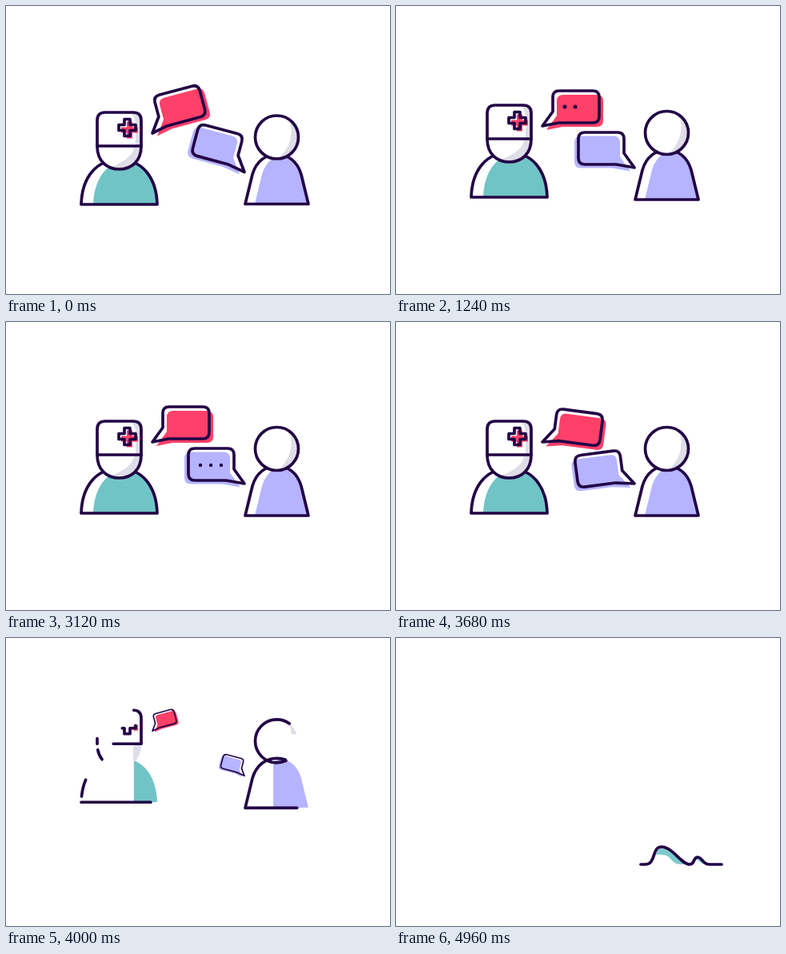
Recreate the animation shown at these times as an HTML page. Size 480 by 360 pixels, loop 5 s.

```html
<!DOCTYPE html>
<html lang="en">
<head>
<meta charset="utf-8">
<title>Doctor and patient chat</title>
<style>
  html, body { margin: 0; width: 100%; height: 100%; overflow: hidden; background: #fff; }
  svg { display: block; width: 100vw; height: 100vh; }
  .line { fill: none; stroke: #220445; stroke-width: 3.7; stroke-linecap: round; stroke-linejoin: round; }
  .shade { fill: #dedde8; }
  .white { fill: #fff; }
  .red { fill: #ff4069; }
  .teal { fill: #71c4c6; }
  .lilac { fill: #b6b4ff; }
  .dot { fill: #220445; }
</style>
</head>
<body>
<svg viewBox="0 0 480 360" xmlns="http://www.w3.org/2000/svg">
  <defs>
    <path id="coat" d="M94 239C95 205 113 183 141.500 183S188 205 189 239Z"/>
    <path id="gown" d="M299 242L308 205C313 188 325 180 338.500 180S364 188 369 205L378 242Z"/>
    <path id="hat" d="M114 166H169V134Q169 124 159 124H124Q114 124 114 134Z"/>
    <path id="face" d="M114 166C114 185 126 195 141.500 195S169 185 169 166"/>
    <path id="head" d="M365.500 158.500A27 27 0 0 0 311.500 158.500A27 27 0 0 0 365.500 158.500Z"/>
    <path id="cross" d="M141 139.500V146.500H148V153.500H155V146.500H162V139.500H155V132.500H148V139.500Z"/>
    <path id="talkL" d="M183 150L196 132V114Q196 106 204 106H246Q254 106 254 114V138Q254 146 246 146H203Z"/>
    <path id="talkR" d="M298 202L285 184V166Q285 158 277 158H236Q228 158 228 166V190Q228 198 236 198H275Z"/>
    <clipPath id="inCoat"><use href="#coat"/></clipPath>
    <clipPath id="inGown"><use href="#gown"/></clipPath>
  </defs>

  <g id="doctor">
    <g clip-path="url(#inCoat)"><g id="coatFill"><use href="#coat" class="teal" transform="translate(15 0)"/></g></g>
    <g id="coatLine"></g>
    <g class="white skin"><use href="#face"/><use href="#hat"/></g>
    <path id="faceShade" class="shade" d="M169 167C169 185 157 195 141.500 195Q136 195 131 193C143 187 159 180 160 167Z"/>
    <path class="shade skin" d="M159 125Q169 125 169 134V165H162V140Q162 130 156 125Z"/>
    <g id="crossFill"><use href="#cross" class="red" transform="translate(3 3)"/></g>
    <g id="faceLine"></g><g id="hatLine"></g><g id="crossLine"></g>
    <g id="bubbleL">
      <use href="#talkL" class="red" transform="translate(5 5)"/>
      <use href="#talkL" class="line"/>
      <g id="dotsL"></g>
    </g>
  </g>

  <g id="patient">
    <g clip-path="url(#inGown)"><g id="gownFill"><use href="#gown" class="lilac" transform="translate(12 0)"/></g></g>
    <g id="gownLine"></g>
    <use href="#head" class="white skin"/>
    <path id="headShade" class="shade" d="M354 137A27 27 0 0 1 339 185.500A42 42 0 0 0 354 137Z"/>
    <g id="headLine"></g>
    <g id="bubbleR">
      <use href="#talkR" class="lilac" transform="translate(-5 4.500)"/>
      <use href="#talkR" class="line"/>
      <g id="dotsR"></g>
    </g>
  </g>

  <g id="chart">
    <g id="chartFill" class="teal">
      <path d="M325 271Q328 261 332 261C345 261 357 283 367 283H358C342 283 345 271 333 271Q329 270 325 271Z"/>
      <path d="M373 278Q377 272 382 277L389 283Q382 283 379 279Q376 276 373 278Z"/>
    </g>
    <path id="chartLine" class="line" pathLength="100" d="M306 283H311C326 283 319 261 332 261C345 261 357 283 367 283C374 283 371 274 377 274C383 274 383 283 392 283H407"/>
  </g>
</svg>
<script>
const LOOP = 5000, TICK = 40;
const $ = id => document.getElementById(id);
const move = (el, x, y) => el.setAttribute('transform', `translate(${x} ${y})`);
const show = (el, on) => { el.style.visibility = on ? 'visible' : 'hidden'; };
const linear = p => p;
const speedUp = p => p * p;
const smooth = p => p < .5 ? 4 * p ** 3 : 1 - 4 * (1 - p) ** 3;

// Value at time t along [time, value] keys.
function track(t, keys, ease = linear) {
  if (t <= keys[0][0]) return keys[0][1];
  for (let i = 1; i < keys.length; i++) {
    const [t0, v0] = keys[i - 1], [t1, v1] = keys[i];
    if (t <= t1) return v0 + (v1 - v0) * ease((t - t0) / (t1 - t0));
  }
  return keys[keys.length - 1][1];
}

// Outlines that open a gap from a to b (percent), then retract from their start.
const outlines = [
  { name: 'coat', a: 11, b: 33, hold: 3880, end: 4120 },
  { name: 'face', a: 23, b: 100, hold: 3880, end: 4080 },
  { name: 'hat', a: 55, b: 93, hold: 3880, end: 4150 },
  { name: 'cross', a: 54, b: 100, hold: 3880, end: 4120 },
  { name: 'gown', a: 38, b: 46, hold: 4170, end: 4320 },
  { name: 'head', a: 82, b: 100, hold: 3880, end: 4160 }
].map(o => {
  const el = $(o.name).cloneNode();
  el.removeAttribute('id');
  el.setAttribute('class', 'line');
  el.setAttribute('pathLength', 100);
  $(o.name + 'Line').append(el);
  return { ...o, el };
});

function trim(t, { el, a, b, hold, end }) {
  const from = track(t, [[3720, b === 100 ? 100 : a], [3880, a]]);
  const to = track(t, [[3720, b === 100 ? 100 : a], [3880, b], [4120, 100]]);
  const first = track(t, [[hold, 0], [end, a]], speedUp);
  show(el, t < end);
  el.style.strokeDashoffset = -first;
  el.style.strokeDasharray = t <= 3720 ? 'none'
    : to >= 100 ? `${from - first} 300`
    : `${from - first} ${to - from} ${100 - to} 300`;
}

function makeDots(id, x, y, r) {
  return [0, 1, 2].map(i => {
    const c = document.createElementNS('http://www.w3.org/2000/svg', 'circle');
    c.setAttribute('class', 'dot');
    c.setAttribute('cx', x + 13 * i);
    c.setAttribute('cy', y);
    c.setAttribute('r', r);
    $(id).append(c);
    return c;
  });
}
const dotsL = makeDots('dotsL', 211, 126, 2.5);
const dotsR = makeDots('dotsR', 243, 179, 2.2);

// [time, dots shown]; a half is a dot fading in.
const typedL = [[400, 1], [520, 2], [600, 3], [720, 1], [880, 2], [960, 3], [1080, 1],
  [1240, 2], [1320, 3], [1440, 1], [1600, 2], [1680, 3], [1800, 1], [1880, 0]];
const typedR = [[2000, .5], [2040, 1], [2200, 2], [2360, 2.5], [2400, 3], [2560, 0],
  [2720, .5], [2760, 1], [2920, 2], [3080, 2.5], [3120, 3], [3280, 0]];

function type(t, dots, steps) {
  let n = 0;
  for (const [at, count] of steps) if (t >= at) n = count;
  dots.forEach((d, i) => { d.style.opacity = Math.max(0, Math.min(1, n - i)); });
}

function swing(el, x, y, angle, size) {
  el.setAttribute('transform', `translate(${x} ${y}) rotate(${angle}) scale(${size}) translate(${-x} ${-y})`);
  show(el, size > 0);
}

// Hides a percentage of a shape, from its left or its bottom edge.
function wipe(id, amount, side = 'left') {
  const el = $(id);
  show(el, amount < 100);
  el.style.clipPath = amount <= 0 ? 'none'
    : side === 'left' ? `inset(0 0 0 ${amount}%)` : `inset(0 0 ${amount}% 0)`;
}

function draw(t) {
  const settle = track(t, [[0, 1], [40, .6], [80, .3], [120, .1], [160, 0]]);
  const hop = (lag, top) => track(t, [[3680 + lag, 0], [3920 + lag, top], [4200, 32]], smooth);
  move($('doctor'), 0, 9 * settle + hop(40, -35));
  move($('patient'), 0, 5.5 * settle + hop(0, -36));

  const tilt = -15 * settle + track(t, [[3560, 0], [3680, 7.5], [3880, -4], [4000, -15]]);
  const size = track(t, [[3880, 1], [4100, 0]]);
  swing($('bubbleL'), 183, 150, tilt, size);
  swing($('bubbleR'), 298, 202, -tilt, size);
  type(t, dotsL, typedL);
  type(t, dotsR, typedR);

  wipe('coatFill', track(t, [[3800, 0], [3880, 7], [4120, 100]]));
  wipe('gownFill', track(t, [[3880, 0], [4200, 78], [4240, 100]]));
  const fade = track(t, [[3760, 0], [3880, 34], [4080, 100]]);
  wipe('faceShade', fade);
  wipe('crossFill', fade);
  wipe('headShade', fade, 'bottom');
  document.querySelectorAll('.skin').forEach(el => show(el, t < 3840));
  outlines.forEach(o => trim(t, o));

  const drawn = track(t, [[4280, 0], [4680, 100]]);
  move($('chart'), 0, track(t, [[4280, 27], [4680, 16], [4960, 0]]));
  show($('chart'), drawn > 0);
  $('chartLine').style.strokeDasharray = `${drawn} 300`;
  $('chartFill').style.opacity = track(t, [[4560, 0], [4800, .9]]);
}

const start = performance.now();
function frame() {
  const t = (performance.now() - start) % LOOP;
  draw(Math.floor(t / TICK) * TICK);
  requestAnimationFrame(frame);
}
frame();
</script>
</body>
</html>
```
